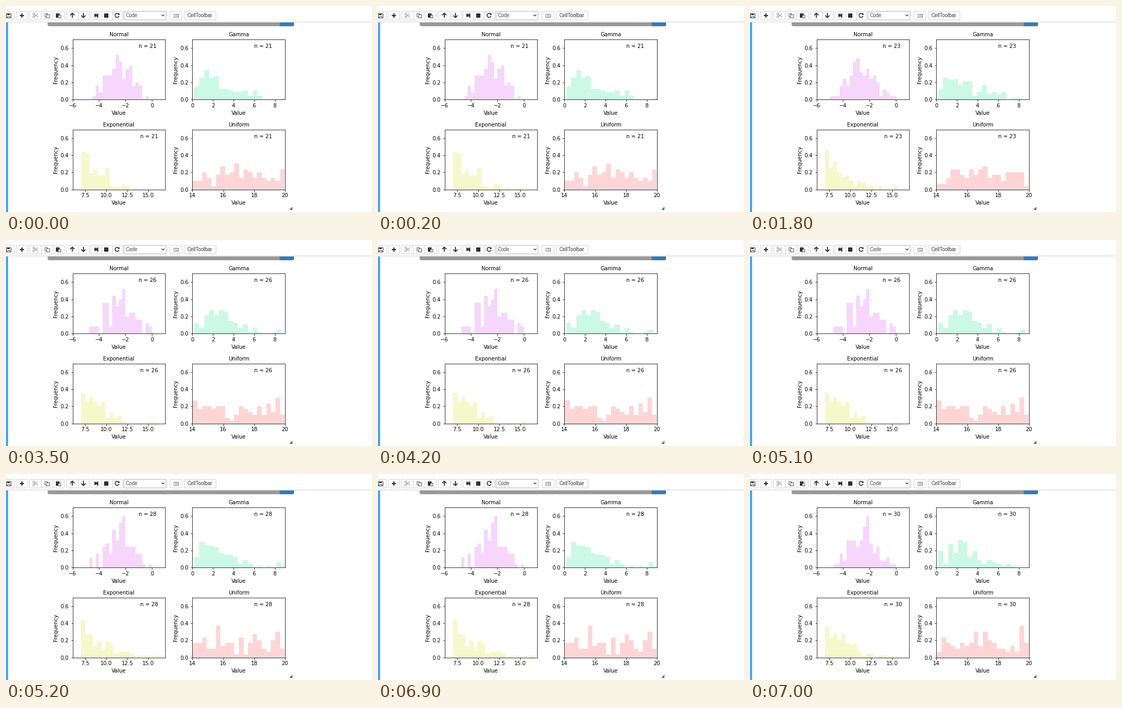
Animation of 690 by 388 pixels, one loop 8000 ms. Source, as a matplotlib script:

```python
import numpy as np
import matplotlib.pyplot as plt
from matplotlib.animation import FuncAnimation
from matplotlib.patches import Arc, Circle, FancyBboxPatch, Polygon, Rectangle

W, H, DPI = 690, 388, 72
STEP, FRAMES = 100, 80
HOLD = 17.3  # frames between redraws
SAMPLES, BINS = 100, 20
INK, DIM, EDGE = "#2f2f2f", "#a0a0a0", "#cacaca"

plt.rcParams.update({"font.family": "DejaVu Sans", "font.size": 10})

fig = plt.figure(figsize=(W / DPI, H / DPI), dpi=DPI, facecolor="white")
page = fig.add_axes([0, 0, 1, 1])
page.set(xlim=(0, W), ylim=(H + .4, .4))
page.axis("off")


def box(x0, y0, x1, y1, fill="none", edge="none", lw=.8):
    page.add_patch(Rectangle((x0, y0), x1 - x0, y1 - y0, fc=fill, ec=edge, lw=lw))


def pill(x0, x1, y0=10.5, y1=26.5, fill="white", edge=EDGE, r=2):
    page.add_patch(FancyBboxPatch((x0, y0), x1 - x0, y1 - y0, fc=fill, ec=edge, lw=.9,
                                  boxstyle=f"round,pad=0,rounding_size={r}"))


def poly(points, color=INK):
    page.add_patch(Polygon(points, fc=color, ec="none"))


def line(xs, ys, color=INK, lw=1.2):
    page.plot(xs, ys, color=color, lw=lw, solid_capstyle="butt")


def label(x, text, size, color):
    page.text(x, 21.5, text, size=size, family="Liberation Sans", color=color)


def arrow(x, sign):
    line([x, x], [13.5, 22.5], lw=1.8)
    tip = 18 + sign * 4.2
    line([x - 4, x, x + 4], [tip - sign * 4, tip, tip - sign * 4], lw=1.8)


def button_group(x0, x1, count=1):
    pill(x0, x1)
    for x in np.linspace(x0, x1, count + 1)[1:-1]:
        line([x, x], [10.5, 26.5], EDGE, .9)


def toolbar():
    button_group(-6, 16)
    button_group(20, 41)
    button_group(44.5, 110, 3)
    button_group(114, 157, 2)
    button_group(160, 220, 3)
    button_group(309, 332)
    button_group(336, 396)
    # Save, add
    box(0, 14.5, 9, 22.5, edge=INK, lw=1)
    box(1.5, 14.5, 6.5, 17, INK)
    box(2, 19.5, 7, 22.5, edge=INK, lw=.8)
    line([26, 34], [18, 18], lw=2.2)
    line([30, 30], [14, 22], lw=2.2)
    # Cut
    for s in (-1, 1):
        page.add_patch(Circle((52.3, 18 + s * 2.8), 1.7, fc="none", ec=DIM, lw=1.1))
        line([53.6, 60], [18 + s * 2, 18 - s * 3.4], DIM, 1.2)
    # Copy, paste
    box(72.5, 14, 78, 20, "white", INK, .8)
    box(76, 16.5, 81.5, 22.5, "white", INK, .8)
    box(94, 14, 101, 22, INK)
    box(96, 13, 99, 15, "#888888")
    box(98, 17, 102.5, 22.5, "white", INK, .8)
    # Move
    arrow(125, -1)
    arrow(146, 1)
    # Run, stop, restart
    for x in (166.5, 169):
        poly([(x, 14), (x + 4, 18), (x, 22)])
    box(172, 14, 173.6, 22, INK)
    box(185, 14, 193, 22, INK)
    page.add_patch(Arc((209.5, 18), 7.6, 7.6, theta1=20, theta2=325, ec=INK, lw=1.6))
    poly([(214, 13.6), (214, 17.6), (210, 17.6)])
    # Cell type
    pill(222.5, 302, edge="#a8a8a8", r=1)
    label(226, "Code", 9.5, "#484848")
    line([293.5, 296, 298.5], [16.7, 19.2, 16.7], "#333333", 1.3)
    # Keyboard
    box(316, 15, 325, 21, edge="#666666", lw=.8)
    for y in (16.8, 18.2, 19.6):
        line([317.5, 323.5], [y, y], "#999999", .7)
    label(342, "CellToolbar", 9.5, "#333333")


def notebook():
    box(0, 31, 3.8, H + 1, "#42a5f5")
    pill(78.5, 543, 24, 38.5, "#999999", "none", 3)
    pill(516, 543, 24, 38.5, "#337ab7", "none", 3)
    box(516, 24, 521, 38.5, "#337ab7")
    box(0, 0, W, 30.4, "white")
    box(0, 29.4, W, 30.9, "#e6e6e6")
    poly([(534, 384), (540, 384), (540, 378)], "#666666")


def panel(col, row, title, color, xlim, ticks, note_x):
    left, width, height = 125.6 + 225.8 * col, 174.6, 112.7
    bottom = 176.1 + 169.4 * row
    ax = fig.add_axes([left / W, 1 - bottom / H, width / W, height / H])
    bars = ax.stairs([0], [0, 1], fill=True, color=color)
    ax.set(xlim=xlim, ylim=(0, .7), xticks=ticks, yticks=[0, .2, .4, .6],
           xlabel="Value", ylabel="Frequency")
    ax.set_title(title, fontsize=10)
    return bars, ax.text(note_x, .6, "")


notebook()
toolbar()

# Sampler, binned span, bars and caption of each panel
panels = [
    (lambda rng: rng.normal(-2.5, 1, SAMPLES), (-5, 0),
     *panel(0, 0, "Normal", "#f6d6fc", (-6, 1), [-6, -4, -2, 0], -1)),
    (lambda rng: rng.gamma(2, 1.5, SAMPLES), (.2, 9.6),
     *panel(1, 0, "Gamma", "#cbf8e7", (0, 9), [0, 2, 4, 6, 8], 6)),
    (lambda rng: 7 + rng.exponential(2, SAMPLES), (7, 16.6),
     *panel(0, 1, "Exponential", "#f4f8cb", (6, 17), [7.5, 10, 12.5, 15], 14)),
    (lambda rng: rng.uniform(14, 20, SAMPLES), (14.03, 19.98),
     *panel(1, 1, "Uniform", "#fdd5d6", (14, 20), [14, 16, 18, 20], 18)),
]


def update(frame):
    draw = int(frame / HOLD)
    n = 21 + round(2.3 * draw)
    rng = np.random.default_rng(n)
    for sample, span, bars, note in panels:
        counts, edges = np.histogram(sample(rng), BINS, span)
        bars.set_data(counts / (SAMPLES * np.diff(edges)), edges)
        note.set_text(f"n = {n}")


anim = FuncAnimation(fig, update, frames=FRAMES, interval=STEP, repeat=True, repeat_delay=0)
plt.show()
```
